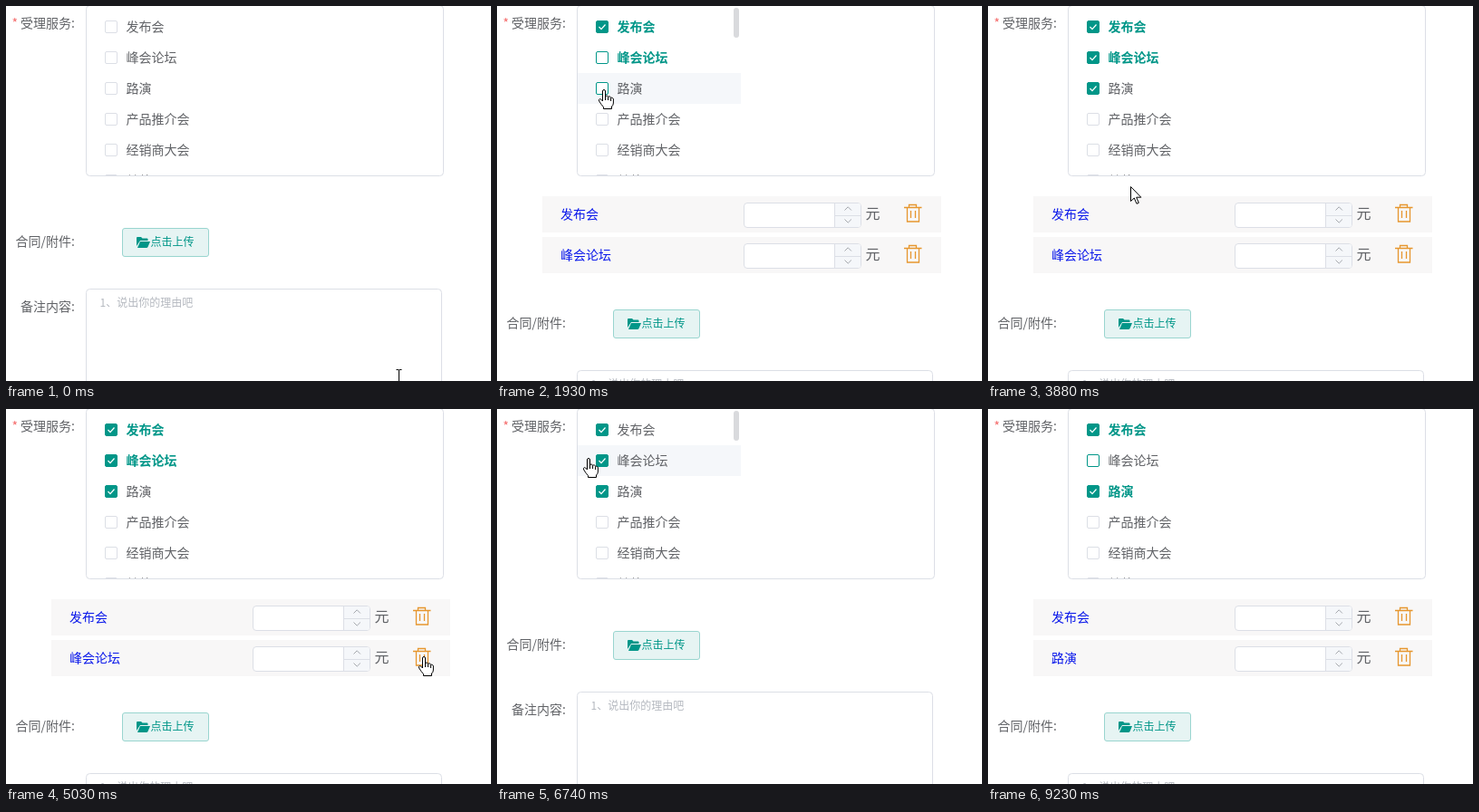
Write an HTML page that moves like this. It is 535 px wide and 414 px high and loops after 9310 ms.

```html
<!DOCTYPE html>
<html lang="zh-CN">
<head>
<meta charset="utf-8">
<style>
html, body { margin: 0; width: 100%; height: 100%; overflow: hidden; background: #fff; }
svg { display: block; font: 14px "Noto Sans CJK SC", "Noto Sans CJK", sans-serif; fill: #606266; cursor: none; }
.line { fill: #fff; stroke: #dcdfe6; }
.on { fill: #009688; font-weight: bold; }
.end { text-anchor: end; }
.icon { fill: none; stroke: #e6962e; stroke-width: 1.3; }
.chevron { fill: none; stroke: #a4a7ad; }
.pointer { fill: #fff; stroke: #000; stroke-linejoin: round; }
</style>
</head>
<body>
<svg width="535" height="414" viewBox="0 0 535 414">
  <defs><clipPath id="listClip"><rect x="89" width="393" height="187"/></clipPath></defs>

  <text class="end" x="76" y="24"><tspan fill="#f56c6c">*</tspan> 受理服务:</text>
  <rect class="line" x="88.5" y="-.5" width="394" height="188" rx="4"/>
  <g clip-path="url(#listClip)">
    <rect id="hover" x="89" width="180" height="34" fill="#f5f7fa"/>
    <g id="items"></g>
    <rect id="bar" x="261" y="2" width="6" height="33" rx="3" fill="#d9dadd"/>
  </g>

  <g id="rows"></g>

  <g id="below">
    <text class="end" x="76" y="265">合同/附件:</text>
    <rect x="128.5" y="245.5" width="95" height="31" rx="2.5" fill="#e6f4f3" stroke="#99d5cf"/>
    <path fill="#009688" d="M144 265V256q0-1 1-1h4l1.5 1.5h5q1 0 1 1V259h-8.500zM145 267l3-7h11l-2.500 6q-.5 1-1.500 1z"/>
    <text x="159.500" y="265" font-size="12" fill="#009688">点击上传</text>
    <text class="end" x="76" y="337">备注内容:</text>
    <rect class="line" x="88.500" y="312.500" width="392" height="150" rx="4"/>
    <text x="103.500" y="331.500" font-size="12" fill="#b4b8bf">1、说出你的理由吧</text>
  </g>

  <circle id="mark" r="12" fill="#ffee20" opacity=".8"/>
  <g id="cursor">
    <path class="pointer" d="M.5.500V16.500L4.300 13 7 19.300 9.300 18.300 6.700 12.200H11.800Z"/>
    <path class="pointer" d="M-1.500 13V2Q-1.500.500 0 .5T1.500 2V8Q2 6.800 3.200 7T4.600 8.700Q5 7.500 6.300 7.900T7.600 9.700Q8.200 8.900 9.300 9.400T10.400 11V15Q10.400 17.500 8.500 19V21.500H-.5V19.500Q-3 17-5.300 13Q-6.200 11-4.600 10.600Q-3.300 10.500-1.500 13M1.500 8v4M4.600 9v3M7.600 10v3"/>
    <path d="M-3-6.500h2.500l.5.500.5-.5H3M0-6V6M-3 6.500h2.500L0 6l.5.500H3" fill="none" stroke="#000"/>
  </g>
</svg>
<script>
const LOOP = 9310, FRAME = 77;
const ITEM_LAG = 70, ROW_LAG = 170, TICK_DELAY = 200;
const LINE = 34, ROW = 45;
const names = ['发布会', '峰会论坛', '路演', '产品推介会', '经销商大会', '其他'];

const spot = (x, y) => ({ x, y });
const item = i => ({ x: 118, y: 24 + LINE * i, item: i, lag: ITEM_LAG });
const bin = i => ({ x: 461, y: 227 + 46 * i, row: i, lag: ROW_LAG });
const go = (start, end, to, press) => ({ start, end, to, press });

// The visitor's script: travel from start to end, then optionally press
const home = spot(433, 408);
const script = [
  go(70, 910, item(0), 1160),
  go(1230, 1230, spot(117, 32)),
  go(1310, 1540, item(1), 1690),
  go(1770, 1920, item(2), 2000),
  go(2150, 2550, spot(370, 290)),
  go(2630, 2930, spot(490, 306)),
  go(3010, 3240, bin(2), 3390),
  go(3710, 3880, spot(157, 199)),
  go(4110, 4330, spot(113, 95)),
  go(4410, 4800, bin(1), 5170),
  go(5410, 5790, bin(0), 5870),
  go(5870, 5870, spot(466, 225)),
  go(6360, 6740, spot(101, 54)),
  go(6960, 7200, item(1), 7360),
  go(7590, 7590, spot(120, 59)),
  go(7670, 8360, spot(495, 411))
];
const EXIT = 8450;

const $ = id => document.getElementById(id);
const show = (el, visible) => el.setAttribute('visibility', visible ? 'visible' : 'hidden');
const shift = (el, x, y) => el.setAttribute('transform', `translate(${x} ${y})`);
const toggle = (set, value) => set.delete(value) || set.add(value);

$('items').innerHTML = names.map((name, i) => `<g transform="translate(0 ${LINE * i})">
  <rect x="109.500" y="16.500" width="13" height="13" rx="1.500"/>
  <path d="M112.500 23l2.500 2.700 4.500-5.200" fill="none" stroke="#fff" stroke-width="1.200"/>
  <text x="132.500" y="28">${name}</text></g>`).join('');

$('rows').innerHTML = names.slice(0, 3).map(name => `<g>
  <rect x="50" y="210" width="440" height="40" fill="#f8f7f7"/>
  <text x="70" y="235" fill="#0a18ea">${name}</text>
  <rect class="line" x="272.500" y="217.500" width="129" height="27" rx="3.500"/>
  <path d="M373 218h26q2 0 2 2v22q0 2-2 2h-26z" fill="#f5f7fa"/>
  <path d="M372.500 218v26M373 231.500h28" stroke="#dcdfe6"/>
  <path class="chevron" d="M383.500 225.500l3.700-3.700 3.700 3.700M383.500 235.500l3.700 3.700 3.700-3.700"/>
  <text x="406.500" y="234.500" font-size="16">元</text>
  <path class="icon" d="M449 222.500h19.500M454.500 222v-2.500h8V222M452.500 223v15h13v-15M456.500 226v8M461.500 226v8"/>
</g>`).join('');

const items = [...$('items').children], rows = [...$('rows').children];
const [arrow, hand, beam] = $('cursor').children;

function pointerAt(t) {
  let { x, y } = home;
  for (const { start, end, to } of script) {
    if (t < start) break;
    const frames = Math.floor((t - start + 10) / FRAME) + 1;
    const p = t >= end ? 1 : Math.min(1, frames * FRAME / (end - start + FRAME));
    const eased = p * p * (3 - 2 * p);
    x += (to.x - x) * eased;
    y += (to.y - y) * eased;
  }
  return spot(Math.round(x), Math.round(y));
}

// Binning a row leaves its box ticked; the next tick rebuilds the rows from the boxes
function formAt(t) {
  const picked = new Set(), ticked = new Set();
  let listed = [], focus, mark;
  for (const { to, press } of script) {
    if (!press || t < press) continue;
    const done = press + to.lag;
    if (t < done) {
      mark = to;
    } else if ('row' in to) {
      listed.splice(to.row, 1);
    } else {
      toggle(picked, to.item);
      if (t >= done + TICK_DELAY) toggle(ticked, to.item);
      listed = [...picked].sort();
      focus = to.item;
    }
  }
  return { listed, ticked, focus, mark };
}

function draw(t) {
  const { x, y } = pointerAt(t);
  const { listed, ticked, focus, mark } = formAt(t);
  const overList = x >= 89 && x < 269 && y < 187;
  const hovered = overList ? Math.floor((y - 6) / LINE) : -1;

  show($('hover'), overList);
  $('hover').setAttribute('y', 6 + LINE * hovered);
  show($('bar'), overList);

  items.forEach((el, i) => {
    const [box, tick, label] = el.children;
    const on = ticked.has(i);
    box.setAttribute('fill', on ? '#009688' : '#fff');
    box.setAttribute('stroke', on || i === hovered || i === focus ? '#009688' : '#dcdfe6');
    show(tick, on);
    label.setAttribute('class', listed.includes(i) ? 'on' : '');
  });

  rows.forEach((row, i) => {
    const place = listed.indexOf(i);
    show(row, place >= 0);
    shift(row, 0, ROW * place);
  });
  const pushed = ROW * listed.length;
  shift($('below'), 0, pushed);

  show($('mark'), mark);
  if (mark) shift($('mark'), mark.x, mark.y);

  const overBin = x > 446 && x < 472 && y > 216 && y < 210 + pushed && (y - 210) % ROW < 32;
  const overText = x > 88 && x < 481 && y > 312 + pushed;
  const shape = overList || overBin ? hand : overText ? beam : arrow;
  for (const el of [arrow, hand, beam]) show(el, el === shape && t < EXIT);
  shift($('cursor'), x + (shape === beam ? .5 : 0), y);
}

function tick() {
  draw(performance.now() % LOOP);
  requestAnimationFrame(tick);
}
tick();
</script>
</body>
</html>
```
